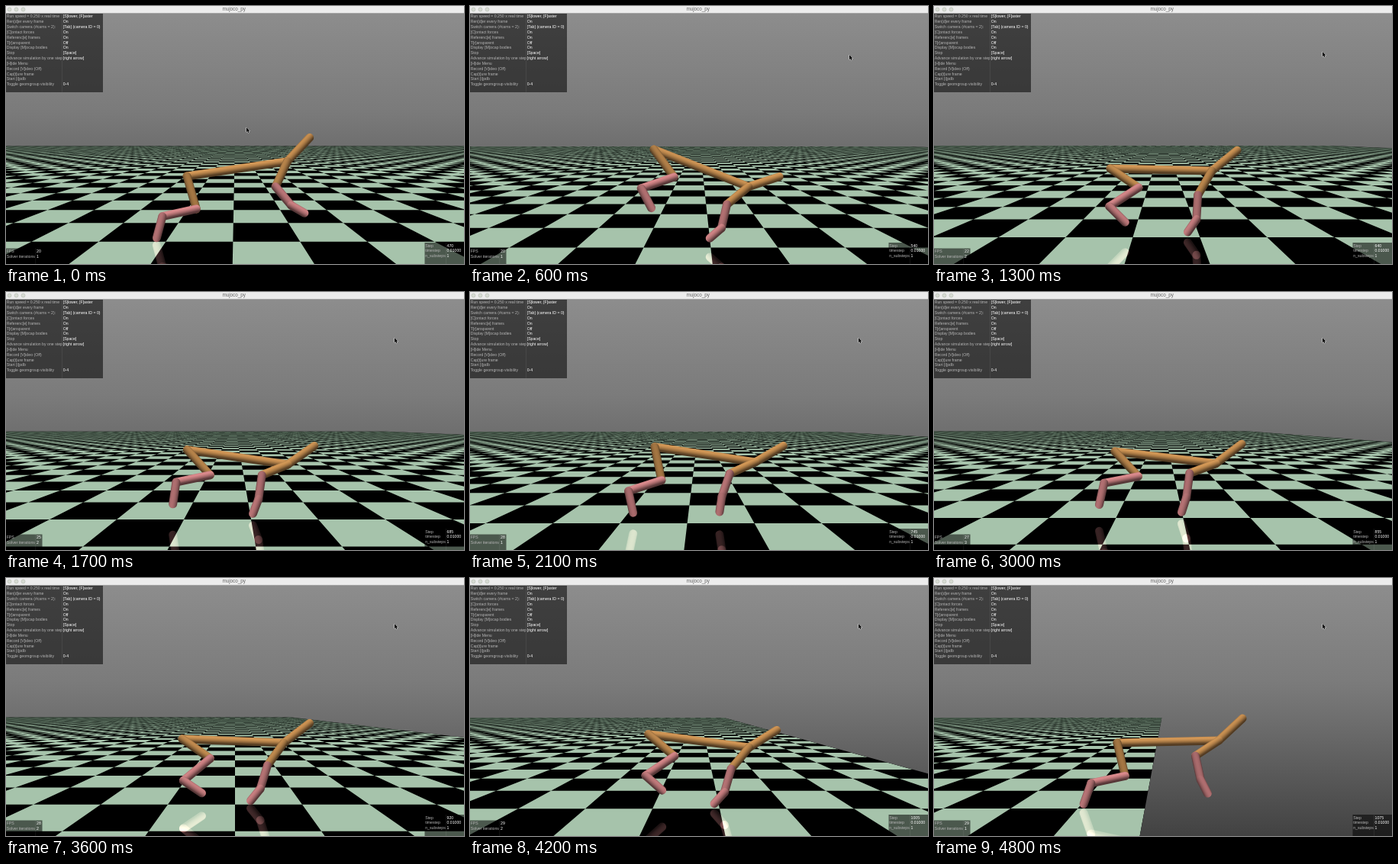
Animation, 600 px wide and 338 px high, one loop 4.9 s. Source, as an HTML page with a canvas:

```html
<!DOCTYPE html>
<html lang="en">
<head>
<meta charset="utf-8">
<title>mujoco_py</title>
<style>
  html, body { margin: 0; width: 100%; height: 100%; overflow: hidden; background: #000; }
  canvas { display: block; width: 600px; height: 338px; }
</style>
</head>
<body>
<canvas id="stage" width="600" height="338"></canvas>
<script>
const ctx = document.getElementById('stage').getContext('2d');
const W = 600, H = 338, LOOP = 4900;
const HELD_TICKS = [3, 14, 31, 44];        // 100 ms ticks without a new picture

// Camera: pinhole, level, three metres from the runner.
const FOCAL = 396, HORIZON = 174, CAM_DIST = 3, HALF_FLOOR = 40, TILE = 2 / 3;

// n: picture count, phase: stride count, x: distance run, h: camera height,
// hip: screen position, a: limb angles in degrees (order of LIMBS).
const KEYS = [
  { n: 0, phase: 0, step: 470, x: 6.02, fps: 20, iter: 1, h: 1.02, hip: [237, 223], a: [-8.4, -46.8, 74, 167.5, 105, 115, 50, 30.5] },
  { n: 5, phase: 2.54, step: 540, x: 10.55, fps: 20, iter: 1, h: 1.08, hip: [241, 188], a: [21.5, -18, 54, 161, 62.5, 140.6, 103, 139] },
  { n: 12, phase: 6.16, step: 640, x: 16.3, fps: 22, iter: 2, h: 0.977, hip: [231, 213], a: [1.3, -39, 34, 147, 45, 120, 93.5, 124.5] },
  { n: 19, phase: 9.82, step: 745, x: 21.45, fps: 28, iter: 1, h: 0.977, hip: [242, 203], a: [8.6, -30, 78.5, 162, 78, 155.5, 109, 98.5] },
  { n: 28, phase: 13.75, step: 855, x: 27.8, fps: 27, iter: 3, h: 0.924, hip: [237, 209], a: [6.8, -37, 47, 169, 102.5, 159.6, 97.6, 108] },
  { n: 33, phase: 16.3, step: 920, x: 32, fps: 28, iter: 2, h: 0.93, hip: [231, 211], a: [2.2, -37.4, 35, 140.5, 34, 126, 107, 129] },
  { n: 44, phase: 21.92, step: 1075, x: 40.18, fps: 29, iter: 1, h: 0.97, hip: [240, 216], a: [-1.3, -43, 76.6, 168, 109.6, 146.7, 77.7, 63] }
];
const frac = v => v - Math.floor(v);
const STRIDE = [...KEYS].sort((p, q) => frac(p.phase) - frac(q.phase));

const ORANGE = [206, 148, 84], PINK = [212, 134, 136];
// parent: limb whose far end this one starts from (-1 is the hip)
const LIMBS = [
  { parent: -1, len: 133, color: ORANGE },
  { parent: 0, len: 42.5, color: ORANGE },
  { parent: -1, len: 44.6, color: ORANGE },
  { parent: 2, len: 45.5, color: PINK },
  { parent: 3, len: 29, color: PINK },
  { parent: 0, len: 36.5, color: ORANGE },
  { parent: 5, len: 32, color: PINK },
  { parent: 6, len: 20, color: PINK }
];
const RADIUS = 5.5, LIGHT = [-0.12, -0.78, 0.61];

const MENU = [
  ['Run speed = 0.250 x real time', '[S]lower, [F]aster'],
  ['Ren[d]er every frame', 'On'],
  ['Switch camera (#cams = 2):', '[Tab] (camera ID = 0)'],
  ['[C]ontact forces', 'On'],
  ['Referenc[e] frames', 'On'],
  ['T[r]ansparent', 'Off'],
  ['Display [M]ocap bodies', 'On'],
  ['Stop', '[Space]'],
  ['Advance simulation by one step', '[right arrow]'],
  ['[H]ide Menu', ''],
  ['Record [V]ideo (Off)', ''],
  ['Cap[t]ure frame', ''],
  ['Start [i]pdb', ''],
  ['Toggle geomgroup visibility', '0-4']
];
const POINTER = [[0, 315, 159], [5, 497, 64], [7, 509, 60], [44, 509, 60]];

const lerp = (a, b, u) => a + (b - a) * u;
const grey = v => `rgb(${v},${v},${v})`;

function bracket(list, pos) {
  let i = 0;
  while (i < list.length - 2 && pos >= list[i + 1]) i++;
  return [i, (pos - list[i]) / (list[i + 1] - list[i])];
}

function poseAt(phase) {
  const p = frac(phase + 1e-9);
  const [i, u] = bracket([...STRIDE.map(k => frac(k.phase)), 1], p);
  const from = STRIDE[i], to = STRIDE[(i + 1) % STRIDE.length];
  const mix = (a, b) => a.map((v, j) => lerp(v, b[j], u));
  return { h: lerp(from.h, to.h, u), hip: mix(from.hip, to.hip), a: mix(from.a, to.a) };
}

function polygon(points) {
  ctx.beginPath();
  for (const [x, y] of points) ctx.lineTo(x, y);
  ctx.closePath();
}

function fillGradient(top, bottom, stops) {
  const g = ctx.createLinearGradient(0, top, 0, bottom);
  for (const [at, color] of stops) g.addColorStop(at, color);
  ctx.fillStyle = g;
  ctx.fillRect(0, top, W, bottom - top);
}

function drawSky() {
  fillGradient(0, H, [[0, grey(142)], [0.4, grey(123)], [0.54, grey(111)], [1, grey(66)]]);
}

// Leaves the floor outline as clip, so the reflection stays on it.
function drawFloor(camX, h) {
  const project = (x, z) => [W / 2 + FOCAL * (x - camX) / z, HORIZON + FOCAL * h / z];
  const near = 2, far = CAM_DIST + HALF_FLOOR;
  const quad = (x0, x1, z0, z1) => [project(x0, z0), project(x1, z0), project(x1, z1), project(x0, z1)];
  polygon(quad(-HALF_FLOOR, HALF_FLOOR, near, far));
  ctx.clip();
  ctx.fillStyle = '#000';
  ctx.fillRect(0, 0, W, H);

  ctx.fillStyle = 'rgb(166,195,171)';
  ctx.beginPath();
  for (let row = -2; row < 60; row++) {
    const z0 = Math.max(near, CAM_DIST + row * TILE), z1 = CAM_DIST + (row + 1) * TILE;
    const reach = z1 * W / 2 / FOCAL;
    const first = Math.max(-60, Math.floor((camX - reach) / TILE));
    const last = Math.min(59, Math.floor((camX + reach) / TILE));
    for (let col = first; col <= last; col++) {
      if ((col + row) & 1) continue;
      quad(col * TILE, (col + 1) * TILE, z0, z1)
        .forEach(([x, y], i) => i ? ctx.lineTo(x, y) : ctx.moveTo(x, y));
    }
  }
  ctx.fill();
  fillGradient(181, 207, [[0, 'rgba(58,76,62,0.75)'], [1, 'rgba(58,76,62,0)']]);
}

function drawCapsule(x0, y0, angle, len, color) {
  const px = -Math.sin(angle), py = Math.cos(angle);
  const g = ctx.createLinearGradient(0, -RADIUS, 0, RADIUS);
  for (let i = 0; i <= 8; i++) {
    const u = i / 4 - 1, nz = Math.sqrt(1 - u * u);
    const lit = Math.max(0, u * (px * LIGHT[0] + py * LIGHT[1]) + nz * LIGHT[2]);
    g.addColorStop(i / 8, `rgb(${color.map(c => Math.round(c * (0.4 + 0.65 * lit)))})`);
  }
  ctx.save();
  ctx.translate(x0, y0);
  ctx.rotate(angle);
  ctx.strokeStyle = g;
  ctx.lineWidth = RADIUS * 2;
  ctx.lineCap = 'round';
  ctx.beginPath();
  ctx.moveTo(0, 0);
  ctx.lineTo(len, 0);
  ctx.stroke();
  ctx.restore();
}

function drawRunner(pose) {
  const ends = [];
  LIMBS.forEach(({ parent, len, color }, i) => {
    const [x, y] = parent < 0 ? pose.hip : ends[parent];
    const angle = pose.a[i] * Math.PI / 180;
    ends.push([x + len * Math.cos(angle), y + len * Math.sin(angle)]);
    drawCapsule(x, y, angle, len, color);
  });
}

function label(text, x, y, color) {
  ctx.fillStyle = color;
  ctx.fillText(text, x, y);
}

function drawPanel(x, y, w, h, split, rows, top) {
  ctx.fillStyle = 'rgba(0,0,0,0.55)';
  ctx.fillRect(x, y, w, h);
  ctx.fillStyle = 'rgba(255,255,255,0.12)';
  ctx.fillRect(split - 1.5, y, 0.6, h);
  rows.forEach(([name, value], i) => {
    const ty = top + i * 6.83;
    label(name, x + 0.7, ty, '#b4b4b4');
    label(value, split, ty, '#fff');
  });
}

function drawTitleBar() {
  ctx.fillStyle = '#ececec';
  ctx.fillRect(0, 0, W, 9);
  ctx.fillStyle = '#b5b5b5';
  ctx.fillRect(0, 9, W, 0.7);
  ctx.lineWidth = 0.6;
  for (const x of [4.5, 13.5, 22.5]) {
    ctx.beginPath();
    ctx.arc(x, 4.5, 2.5, 0, 7);
    ctx.fillStyle = '#d6dad2';
    ctx.strokeStyle = '#b4bab0';
    ctx.fill();
    ctx.stroke();
  }
  ctx.font = '6.3px "Liberation Sans", sans-serif';
  ctx.textAlign = 'center';
  label('mujoco_py', 298.7, 4.7, '#666');
  ctx.textAlign = 'left';
}

function drawPointer(n) {
  const [i, u] = bracket(POINTER.map(p => p[0]), n);
  const x = lerp(POINTER[i][1], POINTER[i + 1][1], u);
  const y = lerp(POINTER[i][2], POINTER[i + 1][2], u);
  polygon([[0, 0], [0, 6.2], [1.4, 5], [2.4, 7.2], [3.4, 6.7], [2.5, 4.7], [4.4, 4.5]]
    .map(([dx, dy]) => [x + dx, y + dy]));
  ctx.lineWidth = 1;
  ctx.strokeStyle = '#eee';
  ctx.stroke();
  ctx.fillStyle = '#000';
  ctx.fill();
}

function draw(time) {
  const tick = Math.floor(time / 100);
  const n = tick - HELD_TICKS.filter(h => h <= tick).length;
  const [i, u] = bracket(KEYS.map(k => k.n), n);
  const from = KEYS[i], to = KEYS[i + 1];
  const at = name => lerp(from[name], to[name], u);
  const pose = poseAt(at('phase'));

  drawSky();
  ctx.save();
  drawFloor(at('x'), pose.h);
  ctx.globalCompositeOperation = 'lighter';
  ctx.globalAlpha = 0.32;
  ctx.translate(0, 2 * (HORIZON + FOCAL * pose.h / CAM_DIST));
  ctx.scale(1, -1);
  drawRunner(pose);
  ctx.restore();
  drawRunner(pose);

  ctx.textBaseline = 'middle';
  drawTitleBar();
  ctx.font = '5.2px "Liberation Sans", sans-serif';
  drawPanel(0, 10, 127, 103, 74.7, MENU, 14);
  const iterations = u < 1 ? from.iter : to.iter;
  drawPanel(0, 317.5, 47.5, 20.5, 40, [
    ['FPS', Math.round(at('fps'))],
    ['Solver iterations', iterations]
  ], 321.3);
  drawPanel(548.5, 310, 51.5, 28, 577.5, [
    ['Step', Math.round(at('step') / 5) * 5],
    ['timestep', '0.01000'],
    ['n_substeps', 1]
  ], 314.2);
  drawPointer(n);
}

const start = performance.now();
function frame() {
  draw((performance.now() - start) % LOOP);
  requestAnimationFrame(frame);
}
frame();
</script>
</body>
</html>
```
